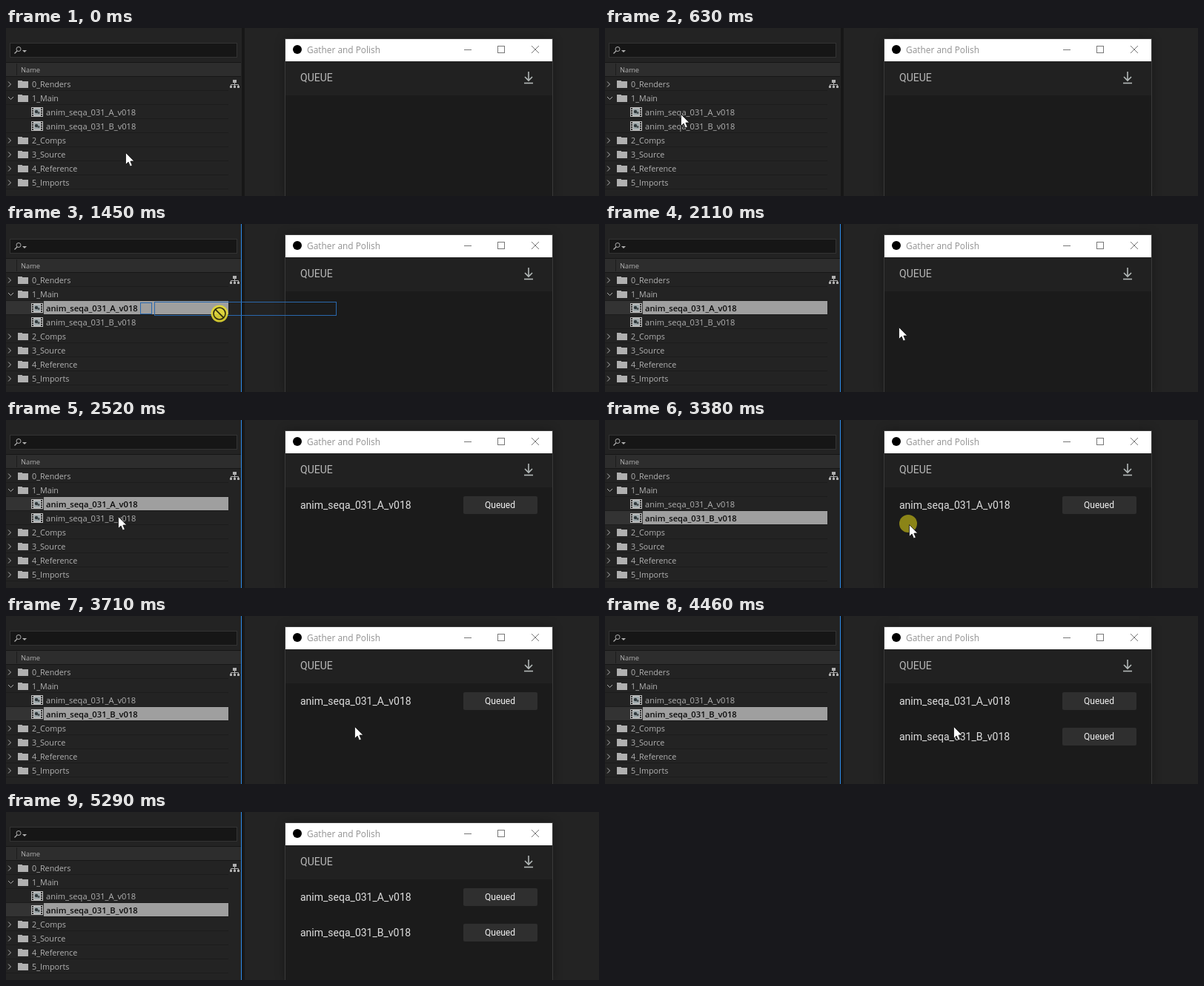
An HTML page with a canvas for the animation above (5.87 s loop, 800 by 227 pixels).

```html
<!DOCTYPE html>
<html lang="en">
<head>
<meta charset="utf-8">
<title>Render queue</title>
<style>
html, body { margin: 0; width: 100%; height: 100%; overflow: hidden; background: #232323; }
canvas { display: block; }
</style>
</head>
<body>
<canvas id="stage" width="800" height="227"></canvas>
<script>
const ctx = document.getElementById('stage').getContext('2d');
const LOOP = 5870;
const UI = '"Open Sans", "Noto Sans", sans-serif';
const APP = 'Roboto, Arial, sans-serif';
const ROW_TOP = 66, ROW_H = 19, WIN_X = 377;
const SELECT_A = 1130, SELECT_B = 3040, QUEUE_A = 2430, QUEUE_B = 4460;
const FILE_A = 'anim_seqa_031_A_v018', FILE_B = 'anim_seqa_031_B_v018';
const FOLDERS = ['0_Renders', '1_Main', '', '', '2_Comps', '3_Source', '4_Reference', '5_Imports'];
const TEXT = '#b2b2b2', ICON = '#b0b0b0', BLUE = '#2a68ad';

// Pointer paths: quadratic curves walked in even steps; row and release mark a drag
const MOVES = [
  { start: 0, end: 380, steps: 5, from: [161, 168], bend: [-10, 112], to: [102, 116] },
  { start: SELECT_A, end: 1700, steps: 7, from: [102, 116], bend: [242, 107], to: [461, 145],
    row: 2, release: 1700 },
  { start: 1870, end: 2520, steps: 8, from: [461, 145], bend: [415, 137], to: [151, 130] },
  { start: SELECT_B, end: 3540, steps: 6, from: [151, 131], bend: [415, 136], to: [470, 149],
    row: 3, release: 3710 },
  { start: 4720, end: 5290, steps: 7, from: [470, 149], bend: [1012, 125], to: [383, 240] }
];

function box(x, y, w, h, color) {
  ctx.fillStyle = color;
  ctx.fillRect(x, y, w, h);
}

function frame(x, y, w, h, color) {
  ctx.strokeStyle = color;
  ctx.lineWidth = 1;
  ctx.strokeRect(x + .5, y + .5, w - 1, h - 1);
}

function text(str, x, y, font, color, align = 'left') {
  ctx.font = font;
  ctx.fillStyle = color;
  ctx.textAlign = align;
  ctx.fillText(str, x, y);
}

function trace(points) {
  ctx.beginPath();
  points.forEach(([x, y]) => ctx.lineTo(x, y));
}

function line(points, color, width = 1) {
  trace(points);
  ctx.strokeStyle = color;
  ctx.lineWidth = width;
  ctx.stroke();
}

function shape(points, color) {
  trace(points);
  ctx.fillStyle = color;
  ctx.fill();
}

function disc(x, y, r, color) {
  ctx.beginPath();
  ctx.arc(x, y, r, 0, Math.PI * 2);
  ctx.fillStyle = color;
  ctx.fill();
}

function ring(x, y, r, color, width) {
  ctx.beginPath();
  ctx.arc(x, y, r, 0, Math.PI * 2);
  ctx.strokeStyle = color;
  ctx.lineWidth = width;
  ctx.stroke();
}

function drawSearch() {
  box(5, 20, 307, 20, '#161616');
  frame(5, 20, 307, 20, '#333333');
  ring(17, 28.5, 3, ICON, 1);
  line([[15, 31], [11.5, 34.5]], ICON, 1.2);
  shape([[22, 30], [28, 30], [25, 33]], ICON);
}

function drawFolder(y, open) {
  if (open) line([[3, y - 2], [6.5, y + 1.5], [10, y - 2]], ICON);
  else line([[3, y - 3.5], [6.5, y], [3, y + 3.5]], ICON);
  box(16, y - 5, 6, 1, ICON);
  box(16, y - 4, 14, 9, ICON);
}

function drawFilm(y) {
  box(34, y - 7, 16, 13, '#bcbcbc');
  for (let i = 0; i < 4; i++) {
    box(35, y - 6 + i * 3, 2, 2, '#2b2b2b');
    box(47, y - 6 + i * 3, 2, 2, '#2b2b2b');
  }
  box(38, y - 5, 8, 9, '#9fa9ac');
  disc(41, y - 1, 2.2, '#30383b');
  disc(44, y + .5, 1.6, '#474e50');
}

function drawFlowchart() {
  box(306, 70, 5, 4, ICON);
  line([[308.5, 74], [308.5, 78]], ICON);
  line([[303.5, 78], [303.5, 76.5], [313.5, 76.5], [313.5, 78]], ICON);
  for (let i = 0; i < 3; i++) box(302 + i * 5, 78, 3, 3, ICON);
}

function drawFile(name, row, selected) {
  const top = ROW_TOP + row * ROW_H, y = top + 10;
  if (selected) {
    box(0, top, 51, 18, '#333333');
    box(51, top, 249, 18, '#9f9f9f');
  }
  drawFilm(y);
  text(name, 54, y + 4, selected ? `600 11.2px ${UI}` : `11.1px ${UI}`,
    selected ? '#0a0a0a' : TEXT);
}

function drawPanel(t) {
  drawSearch();
  box(0, 46, 317, 1, '#151515');
  box(0, 47, 317, 18, '#2d2d2d');
  box(0, 65, 317, 1, '#171717');
  box(14, 48, 1, 16, '#1c1c1c');
  text('Name', 20, 60, `9.3px ${UI}`, TEXT);

  FOLDERS.forEach((name, i) => {
    const y = ROW_TOP + i * ROW_H + 10;
    box(0, y + 8, 300, 1, '#1c1c1c');
    if (!name) return;
    drawFolder(y, name === '1_Main');
    text(name, 35, y + 4, `10.75px ${UI}`, TEXT);
  });
  drawFile(FILE_A, 2, t >= SELECT_A && t < SELECT_B);
  drawFile(FILE_B, 3, t >= SELECT_B);
  drawFlowchart();

  box(318, 0, 4, 227, '#171717');
  if (t >= SELECT_A) box(317, 0, 1, 227, '#2d8ceb');
}

function drawItem(name, y) {
  text(name, 397, y + 5, `14px ${APP}`, '#dedede');
  ctx.beginPath();
  ctx.roundRect(617, y - 12, 100, 24, 2);
  ctx.fillStyle = '#2f2f2f';
  ctx.fill();
  text('Queued', 666.5, y + 4, `12px ${APP}`, '#f0f0f0', 'center');
}

function drawWindow(t) {
  ctx.save();
  ctx.shadowColor = 'rgba(0, 0, 0, .3)';
  ctx.shadowBlur = 12;
  box(WIN_X - 1, 14, 362, 213, '#3a3a3a');
  ctx.restore();
  box(WIN_X, 15, 360, 30, '#ffffff');
  box(WIN_X, 45, 360, 46, '#212121');
  box(WIN_X, 91, 360, 136, '#1b1b1b');

  disc(393, 29, 6, '#000000');
  text('Gather and Polish', 406, 34, `11.9px ${UI}`, '#929292');
  const grey = '#777777';
  line([[618, 29.5], [628, 29.5]], grey);
  frame(663, 24, 10, 10, grey);
  line([[709, 24], [719, 34]], grey);
  line([[719, 24], [709, 34]], grey);

  text('QUEUE', 397, 72, `14px ${APP}`, '#b8b8b8');
  const pale = '#b4bab9';
  line([[705, 59], [705, 71]], pale, 1.6);
  line([[700, 66], [705, 71], [710, 66]], pale, 1.6);
  line([[699, 74.5], [711, 74.5]], pale, 1.6);

  if (t >= QUEUE_A) drawItem(FILE_A, 115);
  if (t >= QUEUE_B) drawItem(FILE_B, 163);
}

function along({ from, bend, to, steps }, step) {
  const s = Math.min(1, Math.max(0, step / steps)), r = 1 - s;
  return from.map((a, i) => r * r * a + 2 * r * s * bend[i] + s * s * to[i]);
}

function drawOutline(dx, dy, row) {
  const top = ROW_TOP + row * ROW_H + Math.round(dy);
  const left = Math.round(dx);
  frame(34 + left, top + 1, 16, 16, BLUE);
  frame(53 + left, top, 246, 19, BLUE);
}

function drawArrow(x, y) {
  const tip = [[0, 0], [0, 16], [3.6, 12.6], [6, 18.4], [8.8, 17.2], [6.4, 11.6], [11.3, 11.4]]
    .map(([px, py]) => [x + .5 + px, y + .5 + py]);
  shape(tip, '#ffffff');
  line([...tip, tip[0]], '#141414', .8);
}

function drawNoDrop(x, y) {
  const d = 5.6;
  disc(x, y, 11.5, 'rgba(226, 216, 50, .9)');
  ring(x, y, 8, '#2c2a10', 1.6);
  line([[x - d, y - d], [x + d, y + d]], '#2c2a10', 1.6);
}

function drawPointer(t) {
  const move = MOVES.findLast(m => m.start <= t);
  const { start, end, steps, from, row, release } = move;
  const step = Math.floor((t - start) / (end - start) * steps + .15);
  const [x, y] = along(move, step).map(Math.round);
  if (!(t < release)) return drawArrow(x, y);

  const speed = x - along(move, step - 1)[0];
  const moved = x - from[0];
  const blocked = moved > 10 && x < WIN_X;
  // The outline trails a blocked pointer and shows over the window once it slows
  if (blocked) drawOutline(moved - speed * .75, 1 + (y - 121) * .7, row);
  else if (moved && speed < 30) drawOutline(moved, y - from[1], row);

  if (blocked) return drawNoDrop(x, y);
  disc(x - 1, y - 1, 12, 'rgba(240, 227, 20, .53)');
  drawArrow(x, y);
}

function draw(t) {
  box(0, 0, 800, 227, '#232323');
  drawPanel(t);
  drawWindow(t);
  drawPointer(t);
}

const origin = performance.now();
function tick() {
  draw((performance.now() - origin) % LOOP);
  requestAnimationFrame(tick);
}
tick();
</script>
</body>
</html>
```
